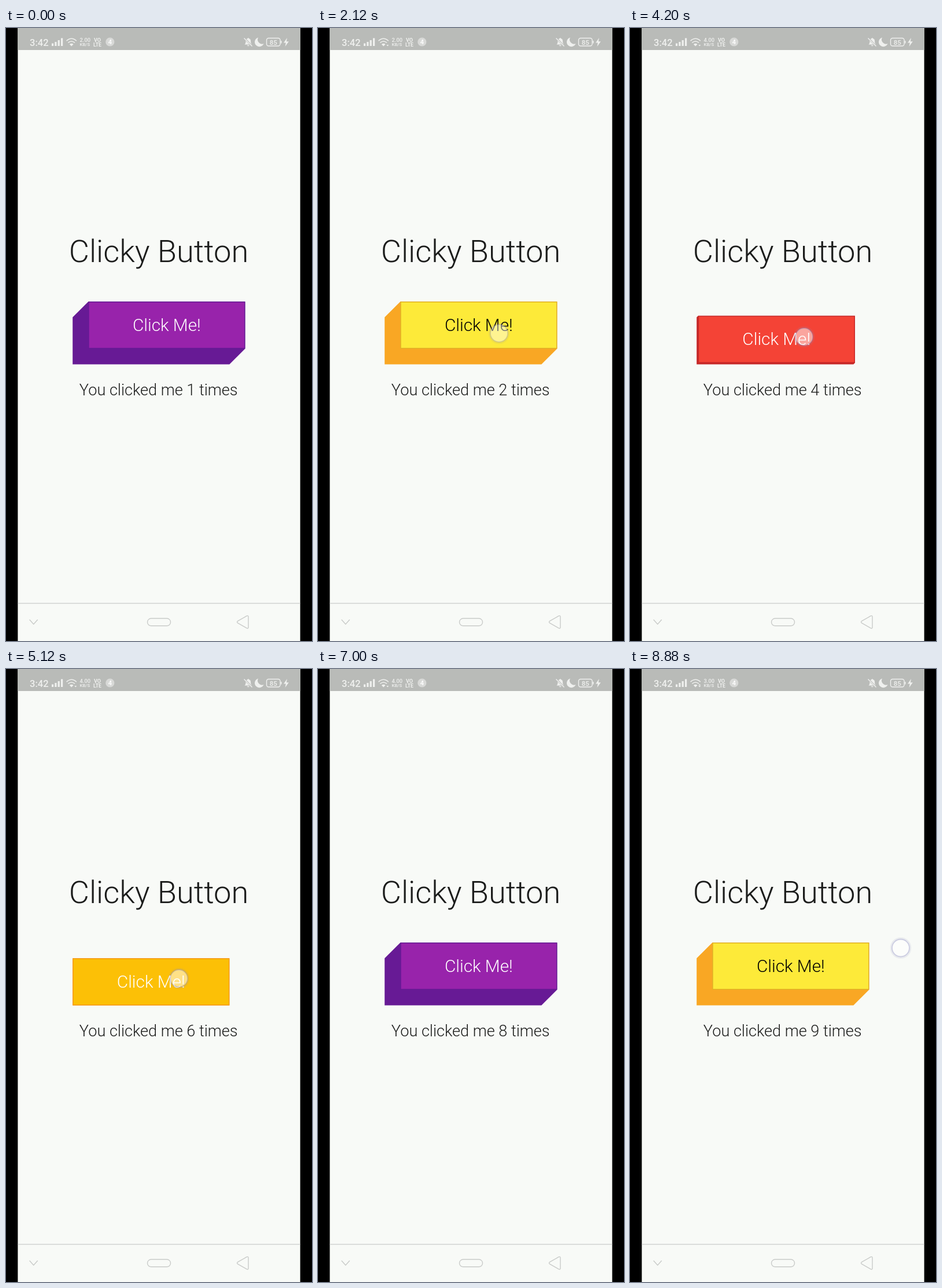
Animation of 529 by 1058 pixels, one loop 8.92 s. Source, as an HTML page:

```html
<!DOCTYPE html>
<html lang="en">
<head>
<meta charset="utf-8">
<title>Clicky Button</title>
<style>
  html, body { margin: 0; width: 100%; height: 100%; overflow: hidden; background: #000; }
  svg { display: block; width: 100vw; height: 100vh; }
  text { font-family: Roboto, sans-serif; }
  .light { font-weight: 300; text-anchor: middle; fill: #1b1c1b; }
  .status { fill: #eff0ee; }
  .status text { font-weight: 500; }
  .line { fill: none; stroke: #eff0ee; stroke-width: 1.4; }
  .nav { fill: none; stroke: #c9cbc9; stroke-width: 1.4; stroke-linejoin: round; stroke-linecap: round; }
</style>
</head>
<body>
<svg viewBox="0 0 529 1058">
  <rect x="20.4" width="488.2" height="1058" fill="#f8faf7"/>
  <rect x="20.4" width="488.2" height="38" fill="#b9bbb8"/>

  <g class="status">
    <text x="41" y="31" font-size="16.5">3:42</text>
    <path d="M79 26.5h3.2v4.500h-3.200zM84.300 24h3.200v7h-3.200zM89.600 21h3.200v10h-3.200zM95 17.500h3.200v13.500h-3.200z"/>
    <path class="line" d="M104.500 22.200q8.700-8 17.400 0M107.400 25.400q5.800-5 11.600 0"/>
    <path d="M109.800 28q3.400-2.600 6.800 0l-3.400 3.600z"/>
    <path id="netDown" d="M118.300 29h4l-2 2.600z"/>
    <path id="netUp" d="M118.300 28.300h4l-2-2.600z"/>
    <text id="speed" x="127.500" y="23.600" font-size="9.300"></text>
    <text x="127.500" y="31.200" font-size="7.800">KB/S</text>
    <text x="152" y="23.600" font-size="9" style="font-weight:700">VO</text>
    <text x="151" y="31.800" font-size="8.600" style="font-weight:700">LTE</text>
    <circle cx="179.800" cy="24" r="7.600" fill="#d8d9d7"/>
    <text x="179.800" y="28" font-size="11" text-anchor="middle" fill="#fff">4</text>

    <path d="M412.500 28.500q2-1.500 2-6q0-4 3.600-4.600v-1h1.400v1q3.600.6 3.600 4.600q0 4.500 2 6zM416.500 29.700h4.500q-2.200 3-4.500 0z"/>
    <path d="M411.500 17l14.500 15" fill="none" stroke="#b9bbb8" stroke-width="3"/>
    <path class="line" d="M411.500 17.500l14 14"/>
    <path d="M436 16.500a8 8 0 1 0 9.500 10.500a7.500 7.500 0 0 1-9.500-10.500z"/>
    <rect class="line" x="450.500" y="17.500" width="23.500" height="13.500" rx="3.500"/>
    <path d="M475 22h1.500v4.500h-1.500z"/>
    <text x="462.200" y="28.500" font-size="11.500" text-anchor="middle">85</text>
    <path d="M486 17l-6 8.500h3.800l-1.200 6.500l6.200-8.800h-4z"/>
  </g>

  <text class="light" x="264" y="403.700" font-size="54.200">Clicky Button</text>
  <path id="block"/>
  <g id="face">
    <rect x="115.900" y="500" width="269.700" height="79.900" stroke-width="1.360"/>
    <text id="label" class="light" x="250.750" y="550" font-size="29.800">Click Me!</text>
  </g>
  <text id="count" class="light" x="263.700" y="633.600" font-size="27.100"></text>

  <path d="M20.400 993h488.200" stroke="#bfc1bf" stroke-width="1.200"/>
  <g class="nav">
    <path d="M41 1021.500l6.700 7.500l6.700-7.500"/>
    <rect x="244.500" y="1019" width="40" height="12.800" rx="6.400"/>
    <path d="M400.500 1023.700l15.800-9q2.700-1 2.700 1.600v18q0 2.600-2.700 1.600l-15.800-9q-2-1.600 0-3.200z"/>
  </g>

  <g id="touch">
    <circle r="17" fill="none" stroke="#9090b8" stroke-opacity=".14" stroke-width="2.500"/>
    <circle r="15" fill="#fff" fill-opacity=".52" stroke="#8c8cc0" stroke-opacity=".42" stroke-width="1.800"/>
  </g>
</svg>
<script>
const LOOP = 8920;
const TRAVEL = 100; // time for the button to sink or rise
const DEPTH = 27.1;

// Face, side, edge and label colours, cycled by click count.
const themes = [
  ['#9823ab', '#671a95', '#671a95', '#fff'],
  ['#fdea39', '#f9a724', '#dfb125', '#000'],
  ['#2094f1', '#1363c0', '#1363c0', '#fff'],
  ['#f44336', '#c62828', '#c62828', '#fff'],
  ['#009688', '#00695c', '#00695c', '#fff'],
  ['#fcc006', '#ff8f00', '#f59a12', '#fff'],
  ['#49ad4f', '#2b7c30', '#2b7c30', '#fff'],
];

// One long hold, one shorter hold, then quick taps at a steady pace.
const taps = [
  { down: 40, up: 2000, x: 313, y: 527 },
  { down: 2400, up: 2920, x: 308, y: 529 },
  { down: 3400, up: 3560, x: 304, y: 531 },
  { down: 4120, up: 4280, x: 301, y: 533 },
  { down: 4960, up: 5120, x: 299, y: 534 },
  { down: 5800, up: 5960, x: 300, y: 531 },
  { down: 6600, up: 6760, x: 301, y: 527 },
  { down: 7400, up: 7550, x: 302, y: 524 },
];
const SWIPE = { start: 8720, length: 160, x: 478, y: 478, dx: -10, dy: 3.5 };

const el = id => document.getElementById(id);
const faceRect = el('face').firstElementChild;
const ramp = (t, start, length) => Math.min(1, Math.max(0, (t - start) / length));
const ease = v => v * v * (3 - 2 * v);

function drawButton(t, tap, clicks) {
  const [front, side, edge, ink] = themes[clicks % themes.length];
  const pressed = tap
    ? ease(ramp(t, tap.down, TRAVEL)) - ease(ramp(t, tap.up, TRAVEL))
    : 0;
  const lift = DEPTH * (1 - pressed);
  el('block').setAttribute('d',
    `M115.2 499.3l${lift} ${-lift}h271.1v81.3l${-lift} ${lift}h-271.1z`);
  el('block').setAttribute('fill', side);
  el('face').setAttribute('transform', `translate(${lift} ${-lift})`);
  faceRect.setAttribute('fill', front);
  faceRect.setAttribute('stroke', edge);
  el('label').style.fill = ink;
  el('count').textContent = `You clicked me ${clicks + 1} times`;
}

function drawTouch(t, tap) {
  let x = 0, y = 0, alpha = 0;
  if (t >= SWIPE.start) {
    const move = ramp(t, SWIPE.start, SWIPE.length);
    x = SWIPE.x + SWIPE.dx * move;
    y = SWIPE.y + SWIPE.dy * move;
    alpha = 1;
  } else if (tap) {
    ({ x, y } = tap);
    alpha = 1 - ramp(t, tap.up + 100, 140);
  }
  el('touch').setAttribute('transform', `translate(${x} ${y})`);
  el('touch').setAttribute('opacity', alpha);
}

function drawStatus(t) {
  el('speed').textContent = t < 3960 ? '2.00' : t < 7480 ? '4.00' : '3.00';
  const busy = (t >= 2900 && t < 3960) || t >= 8700;
  el('netDown').setAttribute('opacity', t >= 200 ? 1 : 0);
  el('netUp').setAttribute('opacity', busy ? 1 : 0);
}

function draw(now) {
  const t = now % LOOP;
  const tap = taps.findLast(({ down }) => t >= down);
  const clicks = taps.filter(({ up }) => t >= up).length;
  drawButton(t, tap, clicks);
  drawTouch(t, tap);
  drawStatus(t);
}

const start = performance.now();
function tick() {
  draw(performance.now() - start);
  requestAnimationFrame(tick);
}
tick();
</script>
</body>
</html>
```
